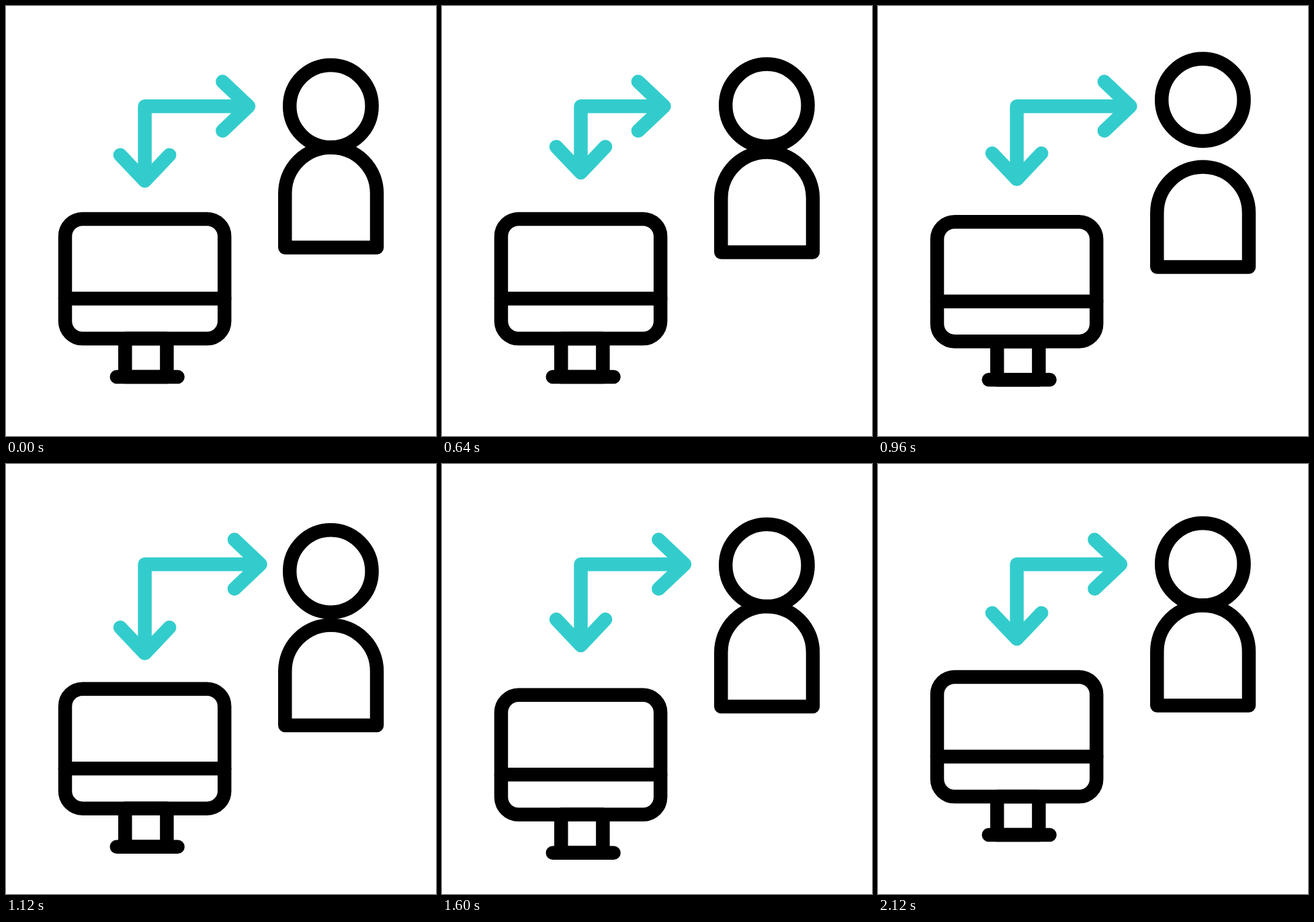
An HTML page that plays this animation: 640 by 640 pixels, repeating every 2200 ms.

```html
<!DOCTYPE html>
<html lang="en">
<head>
<meta charset="utf-8">
<title>Computer and user</title>
<style>
  html, body { margin: 0; width: 100%; height: 100%; overflow: hidden; background: #fff; }
  svg { display: block; width: 100vw; height: 100vh; }
</style>
</head>
<body>
<svg viewBox="0 0 640 640" fill="none" stroke="#000" stroke-width="20.5" stroke-linecap="round" stroke-linejoin="round">
  <path id="arrows" stroke="#33cccc"/>
  <circle id="head" cx="483.4" cy="149.1" r="61.2"/>
  <path id="body" d="M415.3 359.6v-80.8a68.35 68.35 0 0 1 136.7 0v80.8z"/>
  <g id="monitor">
    <rect x="88" y="317" width="237.2" height="178" rx="26"/>
    <path d="M88 435.5h237.2"/>
    <rect x="177.3" y="495" width="62.1" height="57"/>
    <path d="M164.8 552h90.8"/>
  </g>
</svg>
<script>
const LOOP = 2200, STEP = 40;
const $ = id => document.getElementById(id);

// Same curve as cubic-bezier(.5, 0, .5, 1), solved by bisection
function ease(x) {
  let lo = 0, hi = 1;
  for (let i = 0; i < 24; i++) {
    const s = (lo + hi) / 2;
    if (1.5 * s * (1 - s) + s ** 3 < x) lo = s; else hi = s;
  }
  return lo * lo * (3 - 2 * lo);
}

// Sink, pause briefly and rise back.
const dip = t => 29.5 * (ease((t - 426) / 600) - ease((t - 1090) / 620));

// Draw back by `back`, overshoot to `over`, then settle at 0.
function swing(t, windup, leg, back, over) {
  return back * ease(t / windup)
    + (over - back) * ease((t - windup) / leg)
    - over * ease((t - windup - leg) / leg);
}

function drawArrows(right, down) {
  const cornerX = 206.6, cornerY = 149.2, length = 38.6, half = 36.6;
  const x = 361 + right, y = 260.3 + down;
  $('arrows').setAttribute('d',
    `M${x} ${cornerY}H${cornerX}V${y}` +
    `M${x - length} ${cornerY - half}L${x} ${cornerY}l${-length} ${half}` +
    `M${cornerX - half} ${y - length}L${cornerX} ${y}l${half} ${-length}`);
}

function shift(id, y) {
  $(id).setAttribute('transform', `translate(0 ${y})`);
}

function draw(now) {
  const t = Math.floor(now % LOOP / STEP) * STEP;
  drawArrows(swing(t - 60, 520, 480, -31.6, 18), swing(t - 350, 410, 528, -14.5, 29.6));
  shift('head', swing(t - 560, 306, 415, -12, 19.5));
  shift('body', dip(t));
  shift('monitor', dip(t - 364));
}

const start = performance.now();
function tick() {
  draw(performance.now() - start);
  requestAnimationFrame(tick);
}
tick();
</script>
</body>
</html>
```
